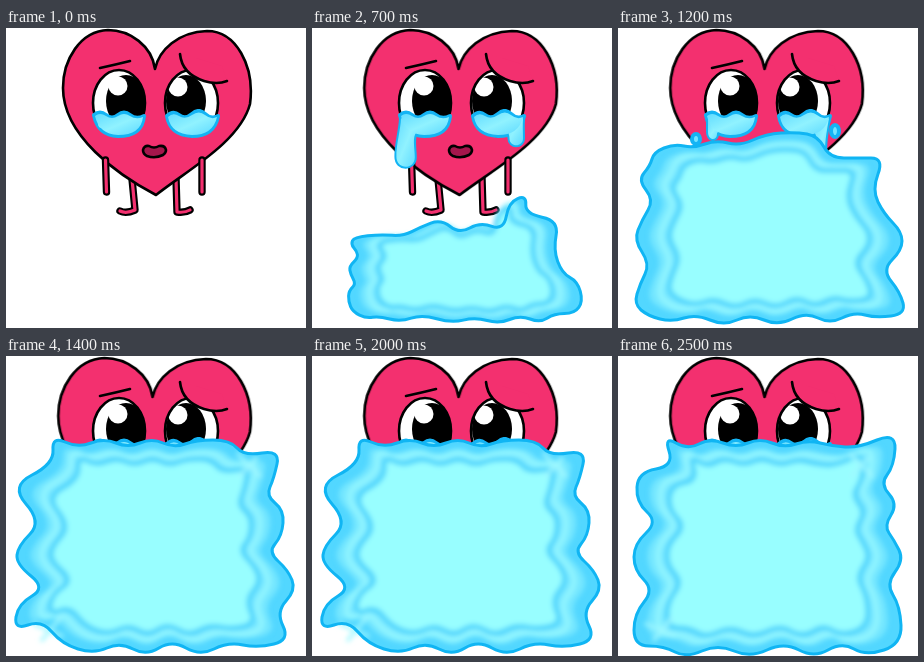
Animation of 300 by 300 pixels, one loop 2.6 s. Source, as an HTML page without scripts:

```html
<!DOCTYPE html>
<html lang="en">
<head>
<meta charset="utf-8">
<title>Crying heart</title>
<style>
html, body { margin: 0; width: 100%; height: 100%; overflow: hidden; background: #fff; }
svg { display: block; width: 100%; height: 100%; }
.ink { stroke: #000; stroke-width: 2.6; stroke-linecap: round; stroke-linejoin: round; }
.pink { fill: #f3306f; }
.line { fill: none; }
.limb { fill: none; stroke: #000; stroke-width: 7.4; stroke-linecap: round; stroke-linejoin: round; }
.skin { stroke: #f3306f; stroke-width: 3.2; }
.wet { fill: #74e4ff; stroke: #14b4f4; stroke-width: 4; stroke-linejoin: round; }
.fill { fill: url(#tear); }

.body { transform-origin: 247px 80px; animation: widen 2.6s infinite; }
@keyframes widen {
  0% { transform: scaleX(1); animation-timing-function: steps(4); }
  15.38%, 100% { transform: scaleX(1.025); }
}

/* tears */
.left { animation: left 2.6s step-end infinite; }
@keyframes left {
  0% { d: path("M92 90C92 92 92 94 92 96C92 102 103 102 103 96C103 94 103 92 104 90Z"); }
  3.84% { d: path("M89 90C90 105 82 130 82 146C82 162 102 162 102 146C102 130 97 112 104 104Z"); }
  7.69%, 38.46% { d: path("M89 90C89 115 82 145 82 170C82 186 102 186 102 170C102 145 97 115 104 104Z"); }
  11.53%, 42.3% { d: path("M89 90C88 120 82 160 82 190C82 208 102 208 102 190C102 160 96 120 104 104Z"); }
  15.38% { d: path("M89 90C87 95 87 98 88 103C88 112 104 112 104 104C104 104 104 104 106 104Z"); animation-timing-function: steps(5); }
  34.61% { d: path("M89 90C90 105 82 130 82 146C82 162 102 162 102 146C102 130 97 112 104 104Z"); }
  46.15%, 100% { d: path("M90 90C90 95 90 98 90 104C90 113 99 113 99 106C99 104 100 104 104 104Z"); }
}
.right { animation: right 2.6s step-end infinite; }
@keyframes right {
  0% { d: path("M196 90C196 92 196 94 196 96C196 102 206 102 206 96C206 94 206 92 206 90Z"); }
  3.84% { d: path("M196 104C199 108 198 112 198 117C198 127 212 127 212 117C212 110 210 100 211 90Z"); animation-timing-function: steps(3); }
  15.38% { d: path("M190 100C200 110 196 160 196 178C196 195 216 195 216 178C216 150 210 120 212 88Z"); }
  19.23%, 50% { d: path("M190 98C194 99 197 102 197 104C197 112 210 112 210 104C210 100 211 94 211 90Z"); animation-timing-function: steps(4); }
  34.61% { d: path("M196 104C199 108 198 112 198 117C198 127 212 127 212 117C212 110 210 100 211 90Z"); animation-timing-function: steps(3); }
  46.15% { d: path("M196 104C199 108 200 112 200 130C200 136 207 136 207 130C207 112 208 108 211 90Z"); }
  100% { d: path("M190 98C194 99 197 102 197 104C197 112 210 112 210 104C210 100 211 94 211 90Z"); }
}
.drop { opacity: 0; animation: drop 2.6s step-end infinite; }
@keyframes drop {
  0% { opacity: 0; }
  15.38% { opacity: 1; transform: none; }
  19.23% { opacity: 1; transform: translateY(50px); }
  23.07%, 100% { opacity: 0; }
}
.blip { opacity: 0; animation: blip 2.6s step-end infinite; }
@keyframes blip {
  0% { opacity: 1; }
  3.84% { opacity: 1; transform: translateY(-5px); }
  7.69%, 100% { opacity: 0; }
}

/* rising pool */
.flood { transform-origin: 150px 290px; animation: flood 2.6s step-end infinite; }
@keyframes flood {
  0% { opacity: 0; }
  11.53% { opacity: 1; transform: scale(.7, .5); }
  15.38%, 100% { opacity: 1; transform: none; }
}
.pool { transform-box: fill-box; transform-origin: center; animation: rise 2.6s step-end infinite; }
@keyframes rise {
  0%, 15.38% {
    d: path("M51 261Q52 258 64 263T80 257T90 254T102 249T113 251T134 263T166 262T188 252T207 242T218 224T230 206T242 224T245 251T248 271T241 283T229 285T216 287T205 291T195 291T185 288T173 289T159 290T145 290T130 288T114 284T99 283T86 285T75 287T66 287T60 286T56 282T54 278T57 274T58 270T53 266T51 261Z");
    animation-timing-function: linear(0 0% 20%, .25 20% 40%, .5 40% 60%, .7 60% 80%, .86 80% 100%);
  }
  34.61% {
    d: path("M36 192Q38 188 52 184T80 186T104 182T126 172T149 176T168 173T186 171T197 161T205 140T212 156T230 182T245 200T246 226T262 240T280 255T283 277T268 285T248 290T228 291T203 293T176 294T148 293T116 291T86 291T62 294T44 292T31 288T23 275T24 260T32 248T35 238T31 227T35 217T40 208T37 200T36 192Z");
    animation-timing-function: steps(3);
  }
  46.15% {
    d: path("M34 131Q36 124 46 120T66 118T87 116T110 115T135 112T163 105T189 106T206 119T226 130T253 130T260 146T260 174T275 195T284 213T274 232T273 253T285 275T273 288T247 287T224 290T200 290T174 291T146 292T119 292T92 292T66 290T42 291T23 282T19 266T27 246T24 224T20 202T30 182T28 162T26 145T34 131Z");
    animation-timing-function: steps(2);
  }
  53.84%, 61.53%, 69.23%, 76.92%, 84.61%, 92.3% {
    d: path("M47 94Q46 80 59 86T85 87T110 87T134 87T157 87T179 88T207 84T231 92T256 97T271 108T264 131T269 147T277 167T269 188T272 205T286 224T280 245T277 270T268 288T237 289T208 293T180 292T153 292T127 293T101 292T72 293T46 276T22 269T10 261T26 240T25 220T11 199T24 178T20 148T26 119T47 94Z");
  }
  57.69%, 65.38%, 73.07%, 80.76%, 88.46%, 96.15%, 100% {
    d: path("M51 95Q46 80 58 87T81 88T105 87T130 87T154 87T178 88T202 87T227 91T259 84T277 93T269 119T271 138T273 159T271 177T281 194T277 216T275 239T283 269T266 294T236 293T210 294T181 294T149 294T116 295T84 295T57 296T31 290T16 274T26 246T26 224T16 201T28 177T29 156T19 131T38 113T51 95Z");
  }
}
.edge { fill: none; stroke: #10b5f3; stroke-width: 3; }
.base { fill: #52d7ff; }
.band { fill: #74e6ff; transform: scale(.9, .92); }
.rim { fill: none; stroke: #90f5ff; stroke-width: 7; transform: scale(.82, .88); }
.panel { fill: #98feff; stroke: #4dd4fc; stroke-width: 6; transform: scale(.75, .82); }
.depth { animation: depth 2.6s infinite; }
@keyframes depth {
  0%, 15.38% { opacity: 0; animation-timing-function: steps(3); }
  26.92%, 100% { opacity: 1; }
}
.shallow { fill: #80efff; animation: shallow 2.6s infinite; }
@keyframes shallow {
  0%, 15.38% { opacity: 1; animation-timing-function: steps(3); }
  26.92%, 100% { opacity: 0; }
}
.glint { fill: none; stroke: #a0f8ff; stroke-width: 4; stroke-linecap: round; animation: glint 2.6s step-end infinite; }
@keyframes glint {
  0% { opacity: 0; }
  53.84%, 100% { opacity: .85; }
}
</style>
</head>
<body>
<svg viewBox="0 0 300 300">
  <defs>
    <linearGradient id="tear" x1="0" y1="0" x2="1" y2="1">
      <stop offset="0" stop-color="#62dcff"/>
      <stop offset=".5" stop-color="#90f2ff"/>
      <stop offset="1" stop-color="#5cd9ff"/>
    </linearGradient>
    <filter id="soft" x="-20%" y="-20%" width="140%" height="140%"><feGaussianBlur stdDeviation="2.4"/></filter>
    <clipPath id="eyeL"><ellipse cx="113" cy="75" rx="26" ry="33"/></clipPath>
    <clipPath id="eyeR"><ellipse cx="185.5" cy="75" rx="26.5" ry="33"/></clipPath>
    <path id="legs" d="M126 151L129 182Q120 186 114 183M170 150L171 184Q179 185 184 182"/>
    <path id="arms" d="M99.500 132L100.500 164M196 132L196 164"/>
    <path id="bead" d="M86 138C86 130 97 130 98 138C98 160 103 185 103 192C103 209 82 209 82 192C82 180 85 155 86 138Z"/>
  </defs>

  <use href="#legs" class="limb"/>
  <use href="#legs" class="limb skin"/>
  <path class="ink pink body" d="M149 41C146 18 124 2 102 2C74 3 57 32 57 60C57 108 112 147 150 167C180 143 234 114 244 76C249 38 230 3 201 3C172 4 153 22 149 41Z"/>
  <use href="#arms" class="limb"/>
  <use href="#arms" class="limb skin"/>

  <g clip-path="url(#eyeL)">
    <path fill="#fff" d="M80 35h65v80h-65z"/>
    <ellipse cx="120" cy="73" rx="20" ry="26"/>
    <circle cx="112" cy="58" r="9.5" fill="#fff"/>
  </g>
  <g clip-path="url(#eyeR)">
    <path fill="#fff" d="M155 35h60v80h-60z"/>
    <ellipse cx="180" cy="73" rx="20" ry="26"/>
    <circle cx="172" cy="59" r="9.5" fill="#fff"/>
  </g>
  <ellipse class="ink line" cx="113" cy="75" rx="26" ry="33"/>
  <ellipse class="ink line" cx="185.5" cy="75" rx="26.5" ry="33"/>
  <path class="pink" d="M174 26Q176 46 198 53Q211 57 221 53L216 38L190 30Z"/>
  <path class="ink line" d="M94 40Q108 37 124 33M174 26Q176 46 198 53Q211 57 221 53"/>
  <path class="ink" fill="#a5164c" d="M137 122Q138 117 143 118Q148 121 153 118Q159 117 160 122Q160 125 157 127Q149 131 141 128Q137 126 137 122Z"/>

  <use href="#bead" class="wet drop"/>
  <g transform="translate(113)">
    <use href="#bead" class="wet drop" style="animation-delay:.1s"/>
  </g>
  <path class="wet left" d=""/>
  <path class="wet right" d=""/>
  <path class="wet" d="M88 87Q94 82 100 87T112 87T124 87T138 88Q136 108 112 108Q92 107 88 87Z"/>
  <path class="wet" d="M161 88Q167 82 173 87T186 86T199 86T212 88Q208 108 186 108Q164 107 161 88Z"/>
  <path class="fill left" d=""/>
  <path class="fill right" d=""/>
  <path class="fill" d="M89 88Q94 84 100 88T112 88T124 88T137 89Q135 107 112 107Q93 106 89 88Z"/>
  <path class="fill" d="M162 89Q167 84 173 88T186 87T199 87T211 89Q207 107 186 107Q165 106 162 89Z"/>

  <g class="wet">
    <ellipse class="blip" style="animation-delay:.4s" cx="57" cy="244" rx="6" ry="4"/>
    <ellipse class="blip" style="animation-delay:.4s" cx="112" cy="239" rx="4" ry="4"/>
    <ellipse class="blip" style="animation-delay:.9s" cx="43" cy="190" rx="6" ry="5"/>
    <ellipse class="blip" style="animation-delay:.9s" cx="175" cy="167" rx="7" ry="4"/>
    <ellipse class="blip" style="animation-delay:.9s" cx="234" cy="177" rx="5" ry="5"/>
    <ellipse class="blip" style="animation-delay:1.2s" cx="217" cy="103" rx="4" ry="6"/>
    <ellipse class="blip" style="animation-delay:1.2s" cx="78" cy="111" rx="4" ry="5"/>
  </g>

  <g class="flood">
    <path class="pool base" d=""/>
    <g class="depth" filter="url(#soft)">
      <path class="pool band" d=""/>
      <path class="pool rim" d=""/>
      <path class="pool panel" d=""/>
      <path class="glint" d="M28 268L56 280M36 284L54 262M232 98L254 120M234 120L250 102"/>
    </g>
    <path class="pool shallow" d=""/>
    <path class="pool edge" d=""/>
  </g>
</svg>
</body>
</html>
```
